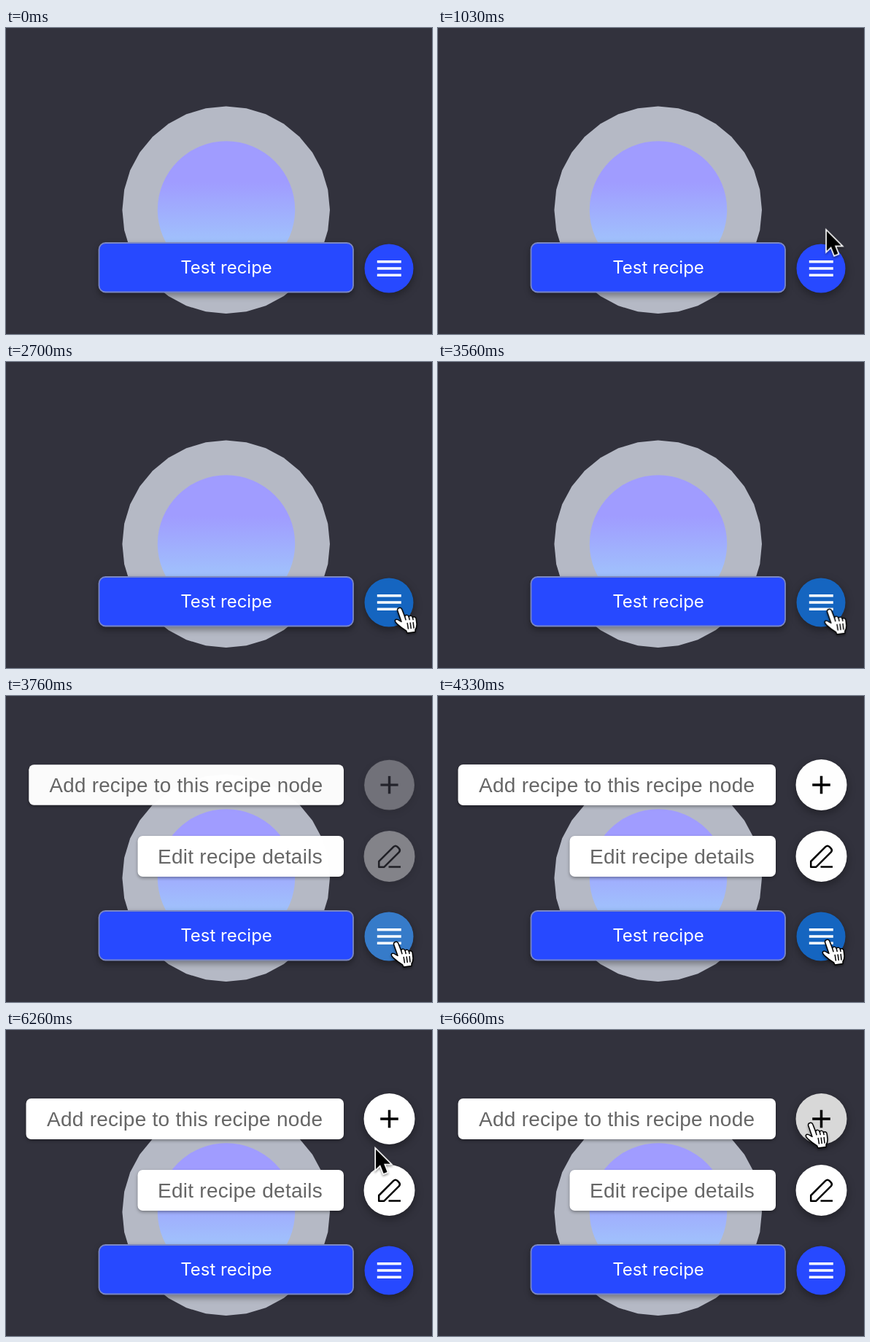
Recreate the animation shown at these times as an HTML page. Size 584x420 px, loop 8 s.

```html
<!DOCTYPE html>
<html lang="en">
<head>
<meta charset="utf-8">
<title>Recipe menu</title>
<style>
  html, body { margin: 0; width: 100%; height: 100%; overflow: hidden; background: #32323d; }
  svg { display: block; width: 584px; height: 420px; }
  .label, .mini { transform-box: fill-box; }
  .label { transform-origin: 100% 50%; filter: drop-shadow(0 2px 2px rgba(0,0,0,.35)); }
  .label rect { fill: #fff; }
  .label text { fill: #666; font: 28px "Liberation Sans", Arial, sans-serif; letter-spacing: .2626px; }
  .mini { transform-origin: 50% 50%; }
  .mini circle { fill: #fff; }
  .mini, #main { filter: drop-shadow(0 4px 6px rgba(0,0,0,.36)); }
  #main .face { fill: #2749ff; }
  #test { filter: drop-shadow(0 4px 4px rgba(0,0,0,.36)); }
  #test text { fill: #fff; font: 24px Inter, sans-serif; }
  #ripple { transform-box: fill-box; transform-origin: 50% 50%; fill: #fff; opacity: 0; }
  #cursor { filter: drop-shadow(0 2px 1.5px rgba(0,0,0,.4)); }
  .pencil { fill: none; stroke: #000; stroke-width: 2.5; stroke-linejoin: round; }
</style>
</head>
<body>
<svg viewBox="0 0 584 420">
  <defs>
    <linearGradient id="sky" x1="0" y1="0" x2="0" y2="1">
      <stop offset=".3" stop-color="#a09cff"/>
      <stop offset=".72" stop-color="#a0c0fc"/>
      <stop offset="1" stop-color="#a0d4fa"/>
    </linearGradient>
    <clipPath id="round"><circle cx="525" cy="330" r="33.5"/></clipPath>
  </defs>

  <polygon id="ring" fill="#b5b9c5"/>
  <circle cx="302" cy="249.5" r="94.2" fill="url(#sky)"/>

  <g id="test">
    <rect x="127.5" y="295" width="348.5" height="67.5" rx="9" fill="#2749ff" stroke="#7b87c3" stroke-width="1.8"/>
    <text x="302" y="337" text-anchor="middle">Test recipe</text>
  </g>

  <g id="addLabel" class="label">
    <rect x="27.5" y="94" width="435.5" height="56" rx="7"/>
    <text x="56" y="132">Add recipe to this recipe node</text>
  </g>
  <g id="editLabel" class="label">
    <rect x="180.5" y="192" width="282.5" height="56" rx="7"/>
    <text x="208" y="230">Edit recipe details</text>
  </g>

  <g id="add" class="mini">
    <circle cx="525.5" cy="122" r="35"/>
    <path d="M513.2 122h24.6M525.5 109.7v24.6" stroke="#000" stroke-width="3.5"/>
  </g>
  <g id="edit" class="mini">
    <circle cx="525.5" cy="220" r="35"/>
    <path class="pencil" d="M511.2 234.7V227L531.3 206.9q2.6-2.4 5.2 0l2.2 2.2q2.4 2.6 0 5.2L518.4 234.7ZM524.5 234.5H541"/>
  </g>

  <g id="main">
    <circle class="face" cx="525" cy="330" r="33.5"/>
    <g clip-path="url(#round)"><circle id="ripple" cx="536" cy="340" r="67"/></g>
    <path d="M508.8 320.8h33M508.8 330h33M508.8 339.2h33" stroke="#fff" stroke-width="3.5"/>
  </g>

  <g id="cursor">
    <path id="arrow" d="M2 4V31L8 25.2 12.6 37 17.5 35 13 23.7H21.8Z"
      fill="#000" stroke="#fff" stroke-width="3.4" paint-order="stroke"/>
    <g id="hand" transform="translate(-8 -2)" stroke="#000" stroke-width="1.5" stroke-linejoin="round" stroke-linecap="round">
      <path fill="#fff" d="M4.6 5C4 1 9.6 0 10.8 3.4L14.6 13.2C15.6 10.6 19.6 10.8 20.2 13.6 21.6 11.6 25 12 25.4 14.6 27.2 13 30 14 30.2 16.8L31 23.5Q31.2 28.6 29 31.5V34.6L18 36 16.6 32.8Q9.5 28.6 5.4 24.6 .6 20.4 1.4 18.4 3 16 7.2 18.8L10 20.4Z"/>
      <path fill="none" d="M18.2 22.5l1.2 7.5M22.2 22l1 7.5M26.2 21.5l.8 7.5M14.6 13.2l1.4 4.5M20.2 13.6l1 4M25.4 14.6l.7 3"/>
    </g>
  </g>
</svg>
<script>
const LOOP = 8000, OPEN = 3565;
const STANDARD = 'cubic-bezier(.4,0,.2,1)';
const $ = s => document.querySelector(s);

// steps: [ms, value, easing towards the next step]
function run(el, prop, steps) {
  const last = steps[steps.length - 1];
  const all = [[0, steps[0][1]], ...steps, [LOOP, last[1]]];
  const frames = all.map(([ms, value, easing = 'linear']) => ({ offset: ms / LOOP, [prop]: value, easing }));
  $(el).animate(frames, { duration: LOOP, iterations: Infinity });
}

function hover(el, from, to, spans) {
  run(el, 'fill', spans.flatMap(([a, b]) => {
    const enter = [[a, from, STANDARD], [a + 250, to]];
    return b ? [...enter, [b, to, STANDARD], [b + 250, from]] : enter;
  }));
}

function reveal(name, delay) {
  const t = OPEN + delay;
  run(name, 'transform', [[t, 'scale(0)', STANDARD], [t + 200, 'scale(1)']]);
  run(name, 'opacity', [[t, 0, 'ease'], [t + 800, 1]]);
  run(name + 'Label', 'transform', [[t, 'scale(.5)', STANDARD], [t + 200, 'scale(1)']]);
  run(name + 'Label', 'opacity', [[t, 0, STANDARD], [t + 200, 1]]);
}

$('#ring').setAttribute('points', Array.from({ length: 32 }, (_, i) => {
  const a = i * Math.PI / 16;
  return [301.7 + 142.3 * Math.cos(a), 249.8 + 142.3 * Math.sin(a)];
}).join(' '));

reveal('#edit', 0);
reveal('#add', 30);

hover('#main .face', '#2749ff', '#1565c0', [[1990, 4480]]);
hover('#edit circle', '#ffffff', '#d8d8d8', [[4640, 5990]]);
hover('#add circle', '#ffffff', '#d8d8d8', [[6330]]);

run('#ripple', 'transform', [[3500, 'scale(0)', STANDARD], [4050, 'scale(1)']]);
run('#ripple', 'opacity', [[3499, 0], [3500, .1], [OPEN, .2, 'ease-in-out'], [4115, 0]]);

// hotspot: [ms, x, y, easing]
const path = [
  [850, 592, 264, 'ease-out'], [1130, 518, 277],
  [1760, 518, 277, 'ease-in'], [1960, 514, 294],
  [2200, 514, 313, 'ease-out'], [2560, 519, 327],
  [2600, 520, 327], [2700, 540, 338, 'ease-out'], [2860, 541, 343, 'ease-in-out'], [3200, 537, 340],
  [3500, 537, 340, 'ease-in-out'], [3760, 535, 338, 'ease-in-out'], [4300, 534, 336],
  [4330, 534, 335, 'ease-in'], [4480, 537, 297], [4640, 540, 252, 'ease-out'], [4900, 538, 242],
  [5800, 538, 242, 'ease-in'], [5990, 519, 186], [6260, 505, 160],
  [6330, 506, 151, 'ease-out'], [6600, 511, 130], [6660, 511, 128]
];
run('#cursor', 'transform', path.map(([ms, x, y, ease]) => [ms, `translate(${x}px,${y}px)`, ease]));

// the pointer turns into a hand over each round button
const swaps = [0, 1990, 4480, 4640, 5990, 6330];
const swap = (el, first) => run(el, 'opacity', swaps.map((ms, i) => [ms, (i + first) % 2, 'step-end']));
swap('#arrow', 1);
swap('#hand', 0);
</script>
</body>
</html>
```
